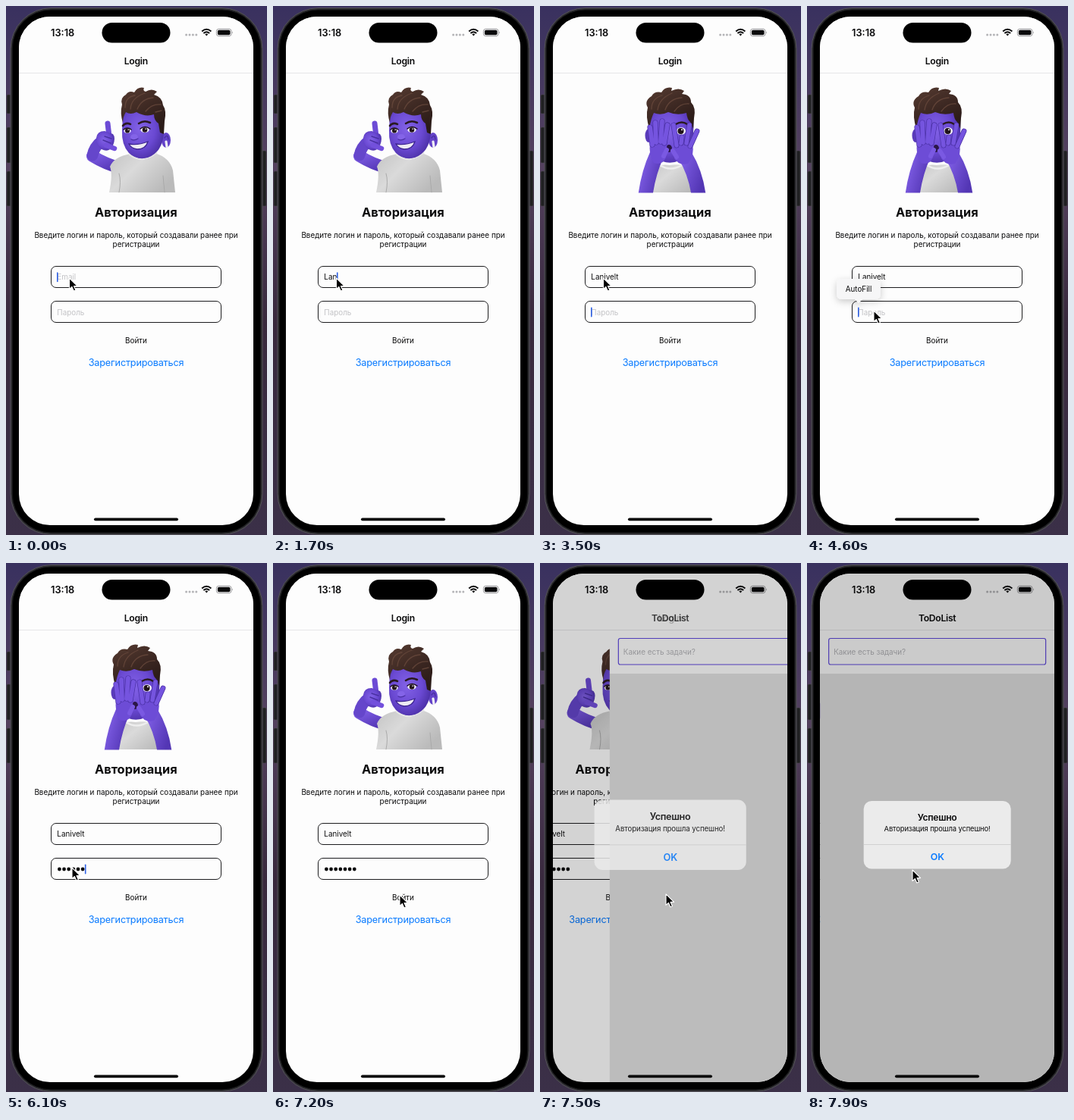
Animation, 344 px wide and 698 px high, one loop 8 s. Source, as an HTML page:

```html
<!DOCTYPE html>
<html lang="ru">
<head>
<meta charset="utf-8">
<title>Login</title>
<style>
html, body { margin: 0; width: 100%; height: 100%; overflow: hidden; background: #3a3050; }
svg { display: block; width: 100vw; height: 100vh; }
text { font: 400 9.9px Inter, "Open Sans", sans-serif; fill: #0b0b0c; }
.mid { text-anchor: middle; }
.nav { font-size: 12.2px; font-weight: 600; letter-spacing: -.3px; }
.hint { fill: #c3c3c6; }
.box { fill: none; stroke: #1c1c1e; stroke-width: 1; }
.hair { fill: none; stroke: #6b4b3e; stroke-width: 1.3; stroke-linecap: round; opacity: .75; }
.limb { fill: none; stroke-linecap: round; stroke-linejoin: round; }
</style>
</head>
<body>
<svg viewBox="0 0 344 698" preserveAspectRatio="none">
<defs>
  <linearGradient id="desk" x2="0" y2="1">
    <stop offset="0" stop-color="#39315f"/><stop offset=".3" stop-color="#54415f"/>
    <stop offset=".6" stop-color="#38293d"/><stop offset="1" stop-color="#3b3048"/>
  </linearGradient>
  <radialGradient id="skin" cx=".42" cy=".45" r=".62">
    <stop offset="0" stop-color="#8262e6"/><stop offset=".6" stop-color="#6a49d2"/><stop offset="1" stop-color="#4a2fa4"/>
  </radialGradient>
  <linearGradient id="arm" x2="1" y2="1">
    <stop offset="0" stop-color="#7c5be2"/><stop offset="1" stop-color="#5336b4"/>
  </linearGradient>
  <linearGradient id="shirt" x2="1" y2=".6">
    <stop offset="0" stop-color="#c4c4c4"/><stop offset=".45" stop-color="#dadada"/><stop offset="1" stop-color="#bababa"/>
  </linearGradient>
  <linearGradient id="brown" x2=".6" y2="1">
    <stop offset="0" stop-color="#563b31"/><stop offset="1" stop-color="#2b1b18"/>
  </linearGradient>
  <filter id="soft" x="-30%" y="-50%" width="160%" height="220%">
    <feDropShadow dx="0" dy="3" stdDeviation="5" flood-opacity=".2"/>
  </filter>
  <clipPath id="screen"><rect x="17" y="14" width="309" height="671" rx="41"/></clipPath>
  <clipPath id="bust"><rect x="100" y="100" width="140" height="146.5"/></clipPath>
</defs>

<rect width="344" height="698" fill="url(#desk)"/>
<g fill="#202022" stroke="#4a4750" stroke-width=".6">
  <rect x="1" y="117" width="8" height="25" rx="1.5"/>
  <rect x="1" y="160" width="8" height="47" rx="1.5"/>
  <rect x="1" y="218" width="8" height="46" rx="1.5"/>
  <rect x="335" y="191" width="8" height="73" rx="1.5"/>
</g>
<rect x="6" y="2.5" width="332" height="695" rx="54" fill="#2c2c2f" stroke="#55535a"/>
<rect x="8.3" y="5" width="327.4" height="690" rx="51" fill="#000" stroke="#18181a"/>

<g clip-path="url(#screen)">
  <rect x="17" y="14" width="309" height="671" fill="#fdfdfd"/>

  <g id="login">
    <g clip-path="url(#bust)">
      <g id="wave">
        <path class="limb" d="M149 213Q132 209 114 198" stroke="url(#arm)" stroke-width="16"/>
        <path class="limb" d="M114 197Q116 186 126 178" stroke="#6546cb" stroke-width="15"/>
        <path d="M136 246Q141 222 137 212Q142 199 164 195Q180 202 196 194Q216 200 220 217L223 246Z" fill="url(#shirt)"/>
        <path class="limb" d="M149 246Q152 231 149 221M209 246L207 224" stroke="#a9a9a9" stroke-width="1"/>
        <path d="M165 187H197V196Q181 209 165 197Z" fill="#4930a2"/>
        <path class="limb" d="M163 196Q180 209 198 194" stroke="#e6e6e6" stroke-width="2.5"/>
        <ellipse cx="211" cy="177" rx="6" ry="10" fill="#6443c9"/>
        <path class="limb" d="M209 174Q213 168 214 176" stroke="#4930a2" stroke-width="1.4"/>
        <path class="limb" d="M211 179L212 186" stroke="#f1f1f4" stroke-width="3.2"/>
        <path d="M154 145Q161 127 189 130Q209 139 208 168Q206 193 187 200Q173 204 162 194Q152 183 153 164Z" fill="url(#skin)"/>
        <path d="M154 154Q150 141 153 130Q150 121 158 117Q162 111 169 114Q174 106 182 108Q180 112 184 113Q192 108 199 113L195 117Q206 120 207 131Q212 138 209 152L208 169L203 167L201 155Q195 151 195 143Q184 147 172 140Q164 144 158 140Q154 146 154 154Z" fill="url(#brown)"/>
        <path class="hair" d="M157 134Q157 120 170 118M164 136Q165 121 183 115M173 136Q179 122 194 121M184 139Q192 129 204 130M197 140L205 138"/>
        <g id="features">
          <path class="limb" d="M154 158Q158 153 164 156M175 155Q182 150 190 154" stroke="#2a1a22" stroke-width="2.6"/>
          <ellipse cx="160" cy="164.5" rx="4.6" ry="3.3" fill="#f5f2fa"/>
          <ellipse cx="183" cy="163.5" rx="5.6" ry="3.5" fill="#f5f2fa"/>
          <circle cx="160" cy="164.5" r="3.1" fill="#24161d"/>
          <circle cx="183" cy="163.5" r="3.3" fill="#24161d"/>
          <circle cx="161.2" cy="163.2" r=".8" fill="#fff"/><circle cx="184.2" cy="162.2" r=".8" fill="#fff"/>
          <path class="limb" d="M155 163Q160 159 165 163M177 162Q183 157 190 162" stroke="#20131c" stroke-width="1.5"/>
          <ellipse cx="169" cy="173" rx="5" ry="4" fill="#8464e8"/>
          <path class="limb" d="M165 176Q169 178 174 175" stroke="#4a2fa4" stroke-width="1.3"/>
          <path d="M162 182Q174 184 187 179Q184 189 173 189Q165 188 162 182Z" fill="#eeeaf4" stroke="#3d2590" stroke-width="1.3"/>
        </g>
        <path class="limb" d="M136 172L134 155" stroke="#6c4bd5" stroke-width="7"/>
        <path d="M119 174Q120 165 130 165L141 169Q145 174 141 184Q136 194 126 189Q118 184 119 174Z" fill="url(#skin)"/>
        <path class="limb" d="M132 184L143 188" stroke="#7350dc" stroke-width="6.5"/>
        <path class="limb" d="M130 172L139 175M128 177L138 181" stroke="#4930a2" stroke-width="1.4"/>
      </g>

      <g id="hide">
        <path d="M139 246L146 216Q155 208 171 210Q188 207 201 215L214 246Z" fill="url(#shirt)"/>
        <path class="limb" d="M158 210Q172 219 187 210" stroke="#eee" stroke-width="2.5"/>
        <ellipse cx="143" cy="171" rx="4.5" ry="9" fill="#5a3bbb"/>
        <path d="M145 145Q151 129 172 130Q196 130 202 148Q204 178 195 196Q173 216 151 199Q142 181 145 145Z" fill="url(#skin)"/>
        <path d="M144 162Q139 145 142 134Q137 125 147 119Q151 112 160 114Q165 106 174 108L173 112Q183 107 190 112L187 116Q199 117 199 127Q206 134 203 148L202 162L198 153Q194 150 193 141Q181 145 169 140Q159 145 150 141Q146 149 144 162Z" fill="url(#brown)"/>
        <path class="hair" d="M147 136Q147 122 161 118M155 137Q157 122 174 115M165 137Q170 122 187 121M177 139Q185 128 196 129"/>
        <path class="limb" d="M179 156Q187 151 194 156" stroke="#2a1a22" stroke-width="2.5"/>
        <ellipse cx="186" cy="165" rx="6" ry="4.8" fill="#f5f2fa"/>
        <circle cx="185.5" cy="165" r="4" fill="#20131a"/><circle cx="187" cy="163.3" r="1" fill="#fff"/>
        <ellipse cx="170" cy="188" rx="4" ry="5" fill="#2b1647"/>
        <path class="limb" d="M139 249Q143 220 154 196" stroke="url(#arm)" stroke-width="19"/>
        <path class="limb" d="M209 249Q205 220 191 197" stroke="url(#arm)" stroke-width="19"/>
        <path d="M145 180Q155 171 168 175L166 200Q161 211 150 207Q143 198 145 180Z" fill="#6d4cd6"/>
        <path d="M178 180Q190 174 201 182Q204 197 195 208Q183 211 177 201Z" fill="#6d4cd6"/>
        <path class="limb" d="M148 183L145 160M153 180L152 154M159 179L161 152M164 181L168 157" stroke="#4a30a5" stroke-width="7.2"/>
        <path class="limb" d="M148 183L145 160M153 180L152 154M159 179L161 152M164 181L168 157" stroke="#7554df" stroke-width="5.8"/>
        <path class="limb" d="M180 184L176 157M186 181L187 173M193 181L197 157M198 185L207 165" stroke="#4a30a5" stroke-width="6.8"/>
        <path class="limb" d="M180 184L176 157M186 181L187 173M193 181L197 157M198 185L207 165" stroke="#7554df" stroke-width="5.4"/>
        <path class="limb" d="M163 198L167 190M180 199L175 191" stroke="#7a59e2" stroke-width="6"/>
      </g>
    </g>

    <text class="mid" x="171.3" y="277.5" style="font-size:16.4px;font-weight:700">Авторизация</text>
    <text class="mid" x="171.5" y="305.5">Введите логин и пароль, который создавали ранее при</text>
    <text class="mid" x="171.5" y="318">регистрации</text>
    <rect class="box" x="59.5" y="343.5" width="224" height="28" rx="6.5"/>
    <rect class="box" x="59.5" y="389.5" width="224" height="28" rx="6.5"/>
    <text id="mailHint" class="hint" x="67.3" y="361.3">Email</text>
    <text id="mail" x="67.3" y="361.3"></text>
    <text id="passHint" class="hint" x="67.3" y="407.5">Пароль</text>
    <g id="dots"></g>
    <rect id="caret" width="1.6" height="13" rx=".8" fill="#2f62e6"/>
    <text class="mid" x="171.5" y="445">Войти</text>
    <text class="mid" x="171.5" y="474.5" style="font-size:12.7px;letter-spacing:-.2px;fill:#0a7bff">Зарегистрироваться</text>
    <g id="bubble">
      <path filter="url(#soft)" fill="#f6f6f7" d="M46 360H90Q97 360 97 367V380Q97 387 90 387H73L68 392L63 387H46Q39 387 39 380V367Q39 360 46 360Z"/>
      <text class="mid" x="68" y="377">AutoFill</text>
    </g>
  </g>

  <g id="todo">
    <rect x="17" y="88" width="309" height="58" fill="#fdfdfd"/>
    <rect x="17" y="146" width="309" height="540" fill="#e2e2e2"/>
    <rect x="28.5" y="99.5" width="286" height="34.5" rx="2.5" fill="none" stroke="#6049e0" stroke-width="1.2"/>
    <text x="35" y="120.8" fill="#b4b4b8" style="fill:#b4b4b8">Какие есть задачи?</text>
  </g>

  <rect x="17" y="14" width="309" height="74" fill="#fdfdfd"/>
  <path d="M17 88.5H326" stroke="#e6e6e8"/>
  <text id="navA" class="nav mid" x="171.3" y="76.8">Login</text>
  <text id="navB" class="nav mid" x="171.6" y="76.8">ToDoList</text>

  <text x="59" y="39.8" style="font-size:12.8px;font-weight:600">13:18</text>
  <g fill="#b4b4b7">
    <circle cx="237.6" cy="38" r="1.5"/><circle cx="242" cy="38" r="1.5"/>
    <circle cx="246.4" cy="38" r="1.5"/><circle cx="250.8" cy="38" r="1.5"/>
  </g>
  <g fill="none" stroke="#0b0b0c" stroke-width="1.9">
    <path d="M258.2 33.5Q264.3 28 270.4 33.5M260.4 36Q264.3 32.4 268.2 36"/>
    <path d="M262.3 37.3Q264.3 35.6 266.3 37.3L264.3 39.4Z" fill="#0b0b0c" stroke="none"/>
  </g>
  <rect x="277.4" y="30.3" width="19.6" height="9.4" rx="3" fill="none" stroke="#8d8d90" stroke-width=".9"/>
  <rect x="278.9" y="31.8" width="16.6" height="6.4" rx="1.8" fill="#0b0b0c"/>
  <path d="M298.3 33.4Q300 35 298.3 36.6Z" fill="#8d8d90"/>

  <rect id="dim" x="17" y="14" width="309" height="671"/>
  <g id="alert">
    <rect x="74.7" y="314" width="194" height="89.5" rx="10.5" fill="#ebebeb"/>
    <path d="M74.7 371.5H268.7" stroke="#cacaca" stroke-width=".8"/>
    <text class="nav mid" x="171.6" y="340">Успешно</text>
    <text class="mid" x="171.6" y="354.2" style="font-size:9.4px;letter-spacing:-.1px">Авторизация прошла успешно!</text>
    <text class="mid" x="171.8" y="392" style="font-size:12.4px;font-weight:600;fill:#0a7bff">OK</text>
  </g>
  <rect x="116" y="675.4" width="111" height="3.8" rx="1.9" fill="#080808"/>
</g>
<rect x="126.5" y="22" width="90" height="26.5" rx="13.2" fill="#000"/>

<path id="mouse" d="M0 0V14.6L3.4 11.5L5.8 17L8.4 15.9L6 10.6H10.6Z" fill="#000" stroke="#fff" stroke-width="1.1" stroke-linejoin="round"/>
</svg>

<script>
const LOOP = 8000, NAME = 'Lanivelt', START = 67.8;
const TAB = 3000, TAP = 4300, MENU_END = 5000, SUBMIT = 7200;
const MAIL_KEYS = [1200, 1400, 1600, 1800, 1950, 2150, 2350, 2550];
const PASS_KEYS = Array.from({ length: 7 }, (_, i) => 5100 + i * 180);
// time, x, y of the pointer tip
const POINTER = [
  [0, 83.5, 359], [3800, 83.5, 359], [4200, 88, 402], [4800, 88, 402], [5200, 87, 402],
  [6450, 87, 402], [7000, 167, 438], [7450, 167, 438], [7900, 139, 405], [8000, 139, 405]
];

const el = {};
document.querySelectorAll('svg [id]').forEach(n => el[n.id] = n);

const dots = PASS_KEYS.map((_, i) => {
  const c = document.createElementNS('http://www.w3.org/2000/svg', 'circle');
  const a = { cx: 70.4 + i * 6.15, cy: 404, r: 2.4, fill: '#0b0b0c' };
  for (const k in a) c.setAttribute(k, a[k]);
  return el.dots.appendChild(c);
});

const show = (node, on) => { node.style.display = on ? '' : 'none'; };
const fade = (node, v) => node.setAttribute('opacity', v.toFixed(3));
const move = (node, x, y = 0) => node.setAttribute('transform', `translate(${x.toFixed(2)} ${y.toFixed(2)})`);
const typed = (keys, t) => keys.filter(k => k <= t).length;
const smooth = u => u * u * (3 - 2 * u);

// critically damped spring from 0 to 1
function spring(ms, rate = 18) {
  const s = Math.max(0, ms) / 1000 * rate;
  return 1 - (1 + s) * Math.exp(-s);
}

function pointerAt(t) {
  const i = Math.max(1, POINTER.findIndex(p => p[0] >= t));
  const [t0, x0, y0] = POINTER[i - 1], [t1, x1, y1] = POINTER[i];
  const u = smooth((t - t0) / (t1 - t0));
  return [x0 + (x1 - x0) * u, y0 + (y1 - y0) * u];
}

function drawForm(t) {
  const n = typed(MAIL_KEYS, t), m = typed(PASS_KEYS, t);
  const inPass = t >= TAB && t < SUBMIT;
  const text = NAME.slice(0, n);
  if (el.mail.textContent !== text) el.mail.textContent = text;
  show(el.mailHint, !n);
  show(el.passHint, !m);
  dots.forEach((d, i) => show(d, i < m));
  show(el.hide, inPass);
  show(el.wave, !inPass);
  show(el.bubble, t >= TAP && t < MENU_END);

  const last = Math.max(-100, ...[...MAIL_KEYS, TAB, TAP, ...PASS_KEYS].filter(k => k <= t));
  show(el.caret, t < SUBMIT && (t - last) % 1000 < 560);
  const x = inPass ? START + m * 6.15 : START + (n ? el.mail.getComputedTextLength() : 0);
  move(el.caret, x - .8, inPass ? 397.5 : 351.3);
}

function draw(t) {
  drawForm(t);
  const push = spring(t - 7349), pop = spring(t - 7317);
  move(el.login, -93 * push);
  move(el.todo, 309 * (1 - push));
  show(el.todo, push > 0);
  fade(el.navA, 1 - push);
  fade(el.navB, push);
  fade(el.dim, .2 * pop);
  fade(el.alert, pop);
  el.alert.setAttribute('transform', `translate(171.7 358.7) scale(${(1.2 - .2 * pop).toFixed(4)}) translate(-171.7 -358.7)`);
  move(el.mouse, ...pointerAt(t));
}

const begin = performance.now();
function tick() {
  draw((performance.now() - begin) % LOOP);
  requestAnimationFrame(tick);
}
tick();
</script>
</body>
</html>
```
